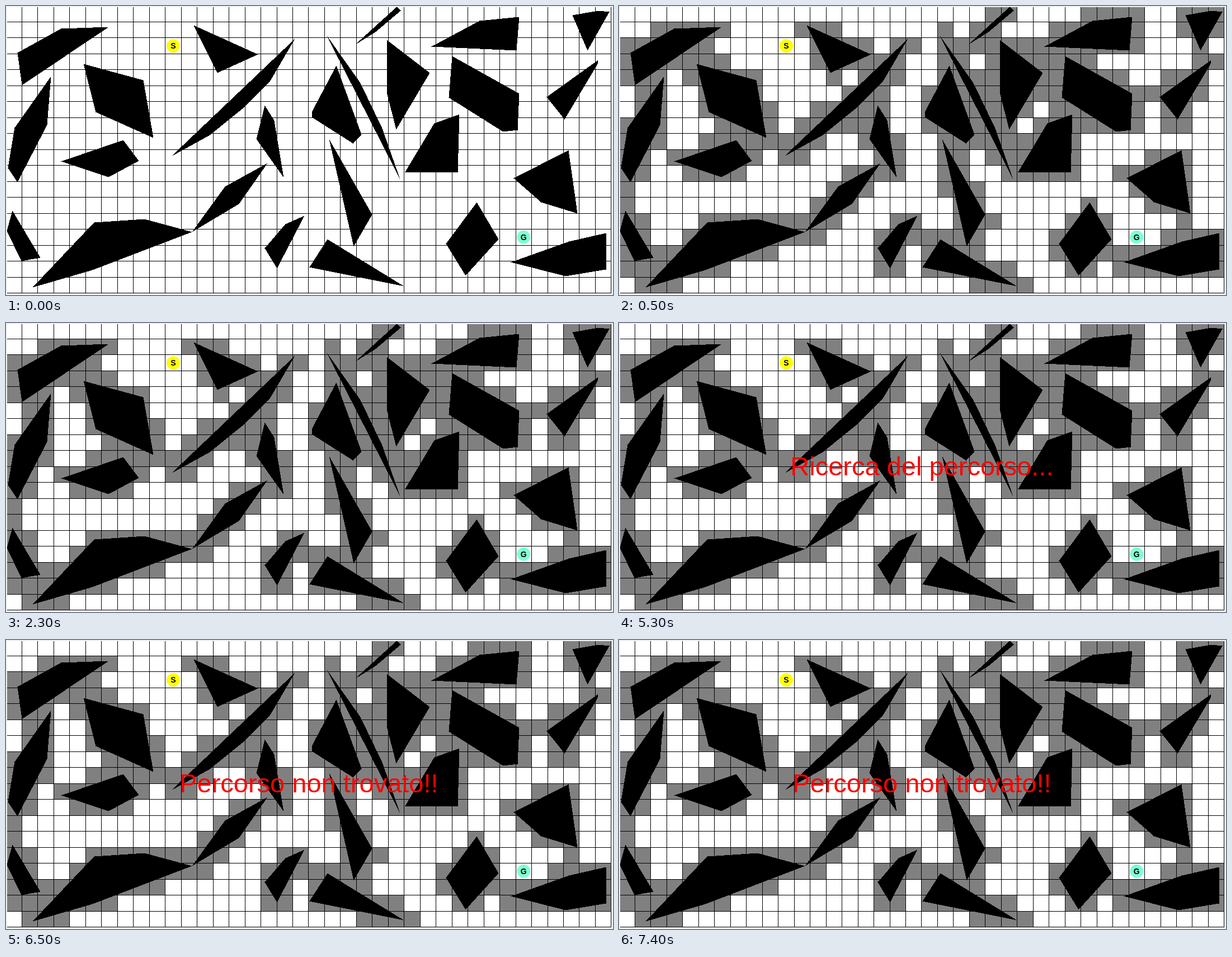
An HTML page for the animation above (8 s loop, 1085 by 516 pixels).

```html
<!DOCTYPE html>
<html lang="it">
<head>
<meta charset="utf-8">
<title>Ricerca del percorso</title>
<style>
  html, body { margin: 0; width: 1085px; height: 516px; overflow: hidden; background: #f0f0f0; }
  svg { display: block; }
  #cells, #grid, #obstacles { shape-rendering: crispEdges; }
  text { font-family: "Liberation Sans", Arial, sans-serif; text-anchor: middle; font-kerning: none; }
  .mark { font-size: 14px; font-weight: bold; }
  .message { font-size: 47px; fill: #f00; }
  #cells, .message { visibility: hidden; animation: 8s step-end infinite; }
  #cells { animation-name: cells; }
  #searching { animation-name: searching; }
  #failed { animation-name: failed; }
  @keyframes cells { 0% { visibility: hidden; } 6.25%, 100% { visibility: visible; } }
  @keyframes searching { 0% { visibility: hidden; } 43.75% { visibility: visible; } 81.25%, 100% { visibility: hidden; } }
  @keyframes failed { 0% { visibility: hidden; } 81.25%, 100% { visibility: visible; } }
</style>
</head>
<body>
<svg width="1085" height="516" viewBox="0 0 1085 516">
  <clipPath id="area"><rect x="2" y="2" width="1080" height="511"/></clipPath>
  <g clip-path="url(#area)">
    <rect width="1085" height="516" fill="#fff"/>
    <path id="cells" fill="#808080"/>
    <path id="grid"/>
    <g id="obstacles" transform="translate(-.5 -.5)">
      <polygon points="21,84 99,41 184,38 29,142"/>
      <polygon points="81,126 16,218 4,290 21,315 74,213"/>
      <polygon points="139,104 246,133 264,236 161,190"/>
      <polygon points="99,278 210,240 238,277 184,306"/>
      <polygon points="12,366 2,402 28,456 62,450"/>
      <polygon points="48,503 158,387 248,381 333,404 155,472"/>
      <polygon points="333,404 392,323 468,281 417,354"/>
      <polygon points="336,35 451,87 378,120"/>
      <polygon points="517,59 473,134 423,184 365,231 296,269"/>
      <polygon points="463,178 448,238 497,307 480,205"/>
      <polygon points="534,375 500,390 463,433 485,469"/>
      <polygon points="575,417 543,467 712,501"/>
      <polygon points="578,238 655,373 622,430"/>
      <polygon points="591,107 547,190 547,199 621,246 636,230"/>
      <polygon points="573,52 634,138 673,219 705,310"/>
      <polygon points="624,70 699,2 706,9 661,47"/>
      <polygon points="681,61 758,120 698,221 681,155"/>
      <polygon points="761,73 847,27 918,20 913,80"/>
      <polygon points="798,90 918,157 915,222 889,225 792,164"/>
      <polygon points="811,194 766,210 714,297 808,298"/>
      <polygon points="1013,17 1059,9 1079,11 1040,80"/>
      <polygon points="1059,97 967,163 999,203 1058,104"/>
      <polygon points="1006,258 908,308 957,351 1022,371"/>
      <polygon points="842,351 881,417 822,482 787,425"/>
      <polygon points="903,458 1007,421 1073,406 1073,471 1001,483"/>
    </g>
  </g>
  <circle cx="299" cy="71.2" r="12" fill="#ff0"/>
  <text class="mark" x="299" y="76">S</text>
  <circle cx="925.3" cy="412.8" r="12" fill="#7fffd4"/>
  <text class="mark" x="925.3" y="418">G</text>
  <text class="message" id="searching" x="541.4" y="272">Ricerca del percorso...</text>
  <text class="message" id="failed" x="541.4" y="272">Percorso non trovato!!</text>
</svg>
<script>
  const cols = 38, rows = 18, size = 28.472;
  const line = i => Math.floor(i * size);
  const shapes = [...document.querySelectorAll('polygon')].map(p => [...p.points].map(q => [q.x, q.y]));

  function span(points, [ax, ay]) {
    const d = points.map(([x, y]) => x * ax + y * ay);
    return [Math.min(...d), Math.max(...d)];
  }

  // Separating axis test for two convex shapes
  function overlap(shape, box) {
    const axes = shape.map(([x, y], i) => {
      const [nx, ny] = shape[(i + 1) % shape.length];
      return [ny - y, x - nx];
    });
    return [[1, 0], [0, 1], ...axes].every(axis => {
      const [a, b] = span(shape, axis), [c, d] = span(box, axis);
      return a < d && c < b;
    });
  }

  let cells = '', grid = '';
  for (let i = 0; i < cols; i++) {
    for (let j = 0; j < rows; j++) {
      const box = [[i, j], [i + 1, j], [i + 1, j + 1], [i, j + 1]].map(([x, y]) => [x * size, y * size]);
      if (shapes.some(s => overlap(s, box))) {
        cells += `M${line(i)} ${line(j)}H${line(i + 1)}V${line(j + 1)}H${line(i)}Z`;
      }
    }
  }
  for (let i = 1; i <= cols; i++) grid += `M${line(i)} 0h1v516h-1Z`;
  for (let j = 1; j <= rows; j++) grid += `M0 ${line(j)}h1085v1H0Z`;
  document.getElementById('cells').setAttribute('d', cells);
  document.getElementById('grid').setAttribute('d', grid);
</script>
</body>
</html>
```
